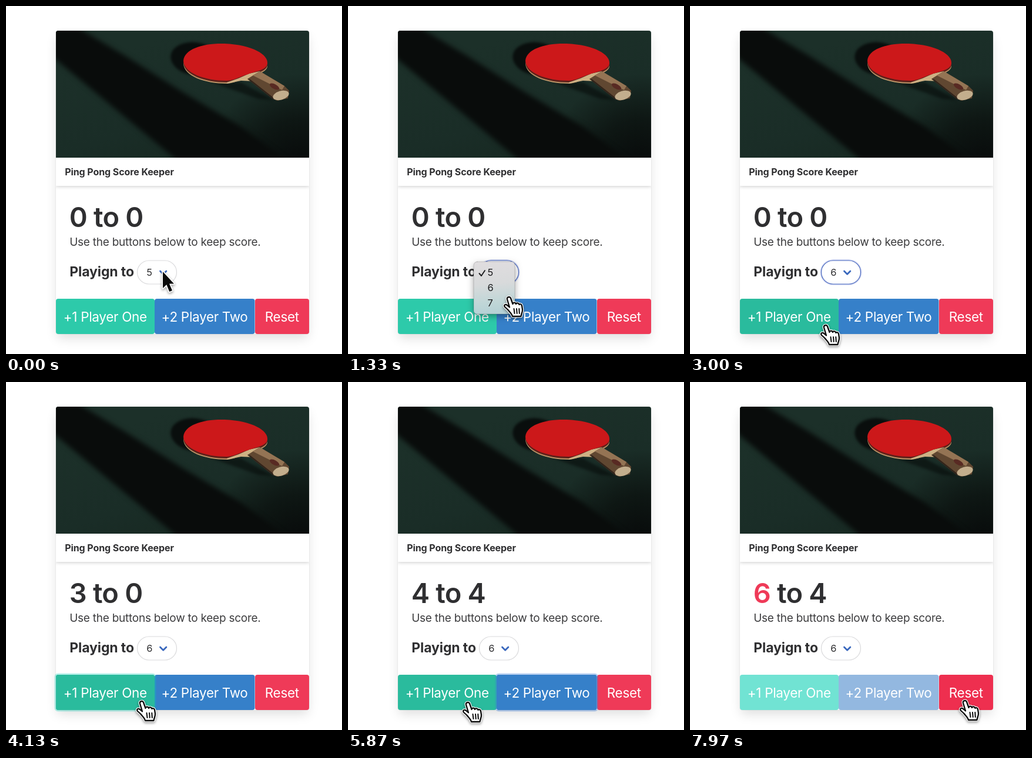
Animation, 572 px wide and 592 px high, one loop 8 s. Source, as an HTML page with a canvas:

```html
<!DOCTYPE html>
<html lang="en">
<head>
<meta charset="utf-8">
<title>Score keeper</title>
<style>
html, body { margin: 0; width: 100%; height: 100%; overflow: hidden; background: #fff; }
canvas { display: block; width: 572px; height: 592px; }
</style>
</head>
<body>
<canvas id="stage"></canvas>
<script>
const W = 572, H = 592, LOOP = 8000;
const INK = '#2f2f31', RED = '#ef3a58';
const canvas = document.getElementById('stage');
const dpr = window.devicePixelRatio || 1;
canvas.width = W * dpr;
canvas.height = H * dpr;
const ctx = canvas.getContext('2d');

// Timeline, in ms
const OPEN = 560, PICK = 2080, HAND_FROM = 60;
const ONE_CLICKS = [3240, 3580, 3920, 4330, 6150, 6480];
const TWO_CLICKS = [4900, 5120, 5340, 5540];
const WIN = ONE_CLICKS[5];

// Cursor tip: time, x, y
const PATH = [
  [0, 267, 452], [300, 267, 453], [900, 268, 455], [1330, 275, 494],
  [1550, 276, 502], [1850, 265, 479], [2150, 264, 480], [2500, 246, 526],
  [2750, 232, 542], [4420, 232, 542], [4780, 312, 541], [5580, 312, 541],
  [5850, 205, 544], [6500, 205, 544], [6700, 196, 537], [6860, 196, 537],
  [7400, 530, 545], [7520, 530, 545], [7820, 469, 541], [LOOP, 469, 541]
];

const BUTTONS = [
  { label: '+1 Player One', x: 85, w: 168, fill: '#2dcaaa', hover: '#2abb9d', off: '#71e3d3', ring: 'rgba(0,205,180,.28)' },
  { label: '+2 Player Two', x: 253, w: 170.5, fill: '#3680c9', hover: '#327ac2', off: '#93b8e0', ring: 'rgba(60,125,215,.35)' },
  { label: 'Reset', x: 424, w: 92, fill: RED, hover: '#ee2f4f' }
];
const BTN_Y = 498, BTN_H = 60;

const count = (times, t) => times.filter(c => c <= t).length;
const ease = u => u * u * (3 - 2 * u);

function cursorAt(t) {
  const i = Math.max(1, PATH.findIndex(p => p[0] > t));
  const [t0, x0, y0] = PATH[i - 1], [t1, x1, y1] = PATH[i];
  const u = ease((t - t0) / (t1 - t0));
  return { x: x0 + (x1 - x0) * u, y: y0 + (y1 - y0) * u };
}

function text(c, str, x, y, size, weight, color, spacing = 0, align = 'left') {
  c.font = `${weight} ${size}px Inter, "Liberation Sans", sans-serif`;
  c.letterSpacing = spacing + 'px';
  c.textAlign = align;
  c.fillStyle = color;
  c.fillText(str, x, y);
  return c.measureText(str).width;
}

function box(c, x, y, w, h, r, fill) {
  c.beginPath();
  c.roundRect(x, y, w, h, r);
  if (fill) { c.fillStyle = fill; c.fill(); }
}

function poly(c, pts, fill) {
  c.beginPath();
  for (let i = 0; i < pts.length; i += 2) c.lineTo(pts[i], pts[i + 1]);
  c.closePath();
  c.fillStyle = fill;
  c.fill();
}

function oval(c, x, y, rx, ry, turn, fill) {
  c.beginPath();
  c.ellipse(x, y, rx, ry, turn, 0, Math.PI * 2);
  c.fillStyle = fill;
  c.fill();
}

function shadow(c, color, blur, dy) {
  c.shadowColor = color;
  c.shadowBlur = blur * dpr;
  c.shadowOffsetY = dy * dpr;
}

function blade(c, dy, fill) {
  c.beginPath();
  c.moveTo(302, 93 + dy);
  c.bezierCurveTo(304, 73 + dy, 335, 63 + dy, 372, 64 + dy);
  c.bezierCurveTo(420, 66 + dy, 447, 83 + dy, 445, 98 + dy);
  c.bezierCurveTo(443, 109 + dy, 425, 111 + dy, 412, 116 + dy);
  c.bezierCurveTo(395, 121 + dy, 390, 126 + dy, 376, 127 + dy);
  c.bezierCurveTo(338, 127 + dy, 303, 114 + dy, 302, 93 + dy);
  c.fillStyle = fill;
  c.fill();
}

function photo(c) {
  c.save();
  box(c, 85, 42, 431, 216, [4, 4, 0, 0]);
  c.clip();
  const felt = c.createLinearGradient(300, 42, 370, 258);
  felt.addColorStop(0, '#1c3029');
  felt.addColorStop(.6, '#1a2d27');
  felt.addColorStop(1, '#172821');
  c.fillStyle = felt;
  c.fillRect(85, 42, 431, 216);

  const dark = c.createRadialGradient(500, 275, 20, 500, 275, 160);
  dark.addColorStop(0, 'rgba(8,11,11,.95)');
  dark.addColorStop(.45, 'rgba(9,13,12,.65)');
  dark.addColorStop(1, 'rgba(10,15,14,0)');
  c.fillStyle = dark;
  c.fillRect(85, 42, 431, 216);

  c.filter = `blur(${4 * dpr}px)`;
  poly(c, [75, 32, 114, 32, 205, 86, 300, 146, 400, 205, 485, 268, 298, 268, 75, 83], '#090c0b');
  c.filter = `blur(${2 * dpr}px)`;
  oval(c, 322, 90, 42, 28, .15, '#090e0d');
  poly(c, [345, 128, 400, 130, 455, 160, 430, 158], 'rgba(8,12,11,.6)');
  c.filter = 'none';

  blade(c, 5, '#bd9668');
  blade(c, 3, '#60201a');
  poly(c, [376, 130, 396, 123, 414, 115, 432, 111, 424, 128, 400, 127, 376, 132], '#ceb184');
  poly(c, [411, 124, 432, 111, 474, 136, 482, 144, 480, 157, 462, 161, 454, 158], '#604731');
  poly(c, [420, 118, 432, 111, 474, 136, 470, 143], '#947454');
  poly(c, [411, 124, 416, 125, 458, 158, 454, 158], '#30231a');
  oval(c, 457, 137, 9, 4, .5, '#582a23');
  oval(c, 468, 152, 14, 7.5, -.28, '#c3ae8d');
  blade(c, 0, '#cc181a');
  c.restore();
}

function drawCard(c) {
  c.save();
  shadow(c, 'rgba(10,10,10,.13)', 19, 9);
  box(c, 87, 44, 427, 512, 4, '#fff');
  c.restore();
  box(c, 84, 41, 433, 518, 5, 'rgba(10,10,10,.035)');
  box(c, 85, 42, 431, 516, 4, '#fff');
  c.save();
  c.beginPath();
  c.rect(85, 258, 431, 60);
  c.clip();
  shadow(c, 'rgba(10,10,10,.16)', 5, 2);
  c.fillStyle = '#fff';
  c.fillRect(85, 258, 431, 48);
  c.restore();
  photo(c);
  text(c, 'Ping Pong Score Keeper', 100.2, 288, 16, 700, INK, -.09);
  text(c, 'Use the buttons below to keep score.', 108.2, 408, 19, 400, '#3c3c3e', -.25);
  text(c, 'Playign to', 108.3, 460, 23, 700, INK, -.12);
}

// The unchanging parts are painted once
let still = null;
function renderStill() {
  still = document.createElement('canvas');
  still.width = canvas.width;
  still.height = canvas.height;
  const c = still.getContext('2d');
  c.scale(dpr, dpr);
  c.fillStyle = '#fff';
  c.fillRect(0, 0, W, H);
  drawCard(c);
}

function drawScore(one, two, won) {
  let x = 107.8;
  x += text(ctx, String(one), x, 376, 47, 600, won ? RED : INK, -.8);
  text(ctx, ' to ' + two, x, 376, 47, 600, INK, -.8);
}

function drawSelect(value, focused) {
  if (focused) box(ctx, 221.5, 431, 71, 44, 22, '#d3d9f3');
  box(ctx, 223.5, 433, 67, 40, 20, '#fff');
  ctx.strokeStyle = focused ? '#4766bd' : '#d9d9db';
  ctx.lineWidth = 1.2;
  ctx.stroke();
  text(ctx, value, 239.3, 459, 16.5, 400, INK);
  ctx.beginPath();
  ctx.moveTo(262.5, 451);
  ctx.lineTo(267.7, 456.2);
  ctx.lineTo(272.9, 451);
  ctx.strokeStyle = '#3a68bd';
  ctx.lineWidth = 2.8;
  ctx.lineCap = ctx.lineJoin = 'round';
  ctx.stroke();
}

function drawButtons(hover, focus, won) {
  BUTTONS.forEach((b, i) => {
    const off = won && b.off;
    box(ctx, b.x, BTN_Y, b.w, BTN_H, 4, off ? b.off : hover === i ? b.hover : b.fill);
  });
  const f = BUTTONS[focus];
  if (f) {
    box(ctx, f.x - 2.5, BTN_Y - 2.5, f.w + 5, BTN_H + 5, 6, f.ring);
    box(ctx, f.x, BTN_Y, f.w, BTN_H, 4, hover === focus ? f.hover : f.fill);
  }
  BUTTONS.forEach(b => text(ctx, b.label, b.x + b.w / 2 - .2, 537, 22.5, 400, '#fff', -.32, 'center'));
}

function drawMenu(lit) {
  const x = 214, y = 435, w = 70, h = 89;
  ctx.save();
  shadow(ctx, 'rgba(0,0,0,.35)', 12, 4);
  box(ctx, x, y, w, h, 6, '#dddcde');
  ctx.restore();
  const tint = ctx.createLinearGradient(x, y, x + 8, y + h);
  tint.addColorStop(0, '#e0dddf');
  tint.addColorStop(.45, '#d8dadb');
  tint.addColorStop(.8, '#c0d6d7');
  tint.addColorStop(1, '#b5d1d5');
  box(ctx, x, y, w, h, 6, tint);
  ctx.strokeStyle = 'rgba(0,0,0,.2)';
  ctx.lineWidth = .8;
  ctx.stroke();
  ['5', '6', '7'].forEach((n, i) => {
    const on = lit === i;
    if (on) box(ctx, x + 5, 441 + i * 26, w - 10, 25, 4, '#3d79d8');
    text(ctx, n, 237.5, 459 + i * 26, 16.5, 400, on ? '#fff' : '#1c1c1e');
  });
  ctx.beginPath();
  ctx.moveTo(223.5, 455);
  ctx.lineTo(227, 459);
  ctx.lineTo(233, 450);
  ctx.strokeStyle = '#1c1c1e';
  ctx.lineWidth = 1.9;
  ctx.stroke();
}

function outlined(path, outer, inner, fill) {
  ctx.lineJoin = 'round';
  ctx.save();
  shadow(ctx, 'rgba(0,0,0,.4)', 4, 2);
  ctx.strokeStyle = '#fff';
  ctx.lineWidth = outer;
  ctx.stroke(path);
  ctx.restore();
  ctx.fillStyle = fill;
  ctx.fill(path);
  if (inner) {
    ctx.strokeStyle = '#0a0a0a';
    ctx.lineWidth = inner;
    ctx.stroke(path);
  }
}

const ARROW = new Path2D('M0 0V28L6.3 22L11.2 34L16 32L11 20.5H19Z');
const HAND = new Path2D('M-4 5C-5 1 .5-.5 2 3L5.5 13C6 9.8 10 9.8 11 13C11.5 10.8 15.5 10.8 16.5 14' +
  'C17.5 12.3 20.5 13 21 16L22 22C22.5 27 20 29 19.5 34H5C4 29.5 1 27.5-3 22.5L-8 18C-10.5 15-7 12.5-4 15L0 18.5Z');
const HAND_LINES = new Path2D('M7.5 21L8.5 29M12 21L12.7 29M16.3 21L16.8 29');

function drawCursor(p, kind) {
  ctx.save();
  ctx.translate(p.x, p.y);
  ctx.lineCap = 'round';
  if (kind === 'hand') {
    outlined(HAND, 4.6, 2.3, '#fff');
    ctx.lineWidth = 2;
    ctx.stroke(HAND_LINES);
  } else {
    if (kind === 'banned') {
      const sign = new Path2D();
      sign.arc(20.5, 46.5, 17, 0, Math.PI * 2);
      sign.moveTo(9, 35);
      sign.lineTo(32, 58);
      ctx.save();
      shadow(ctx, 'rgba(0,0,0,.3)', 3, 1);
      ctx.strokeStyle = '#f6f6f6';
      ctx.lineWidth = 7.5;
      ctx.stroke(sign);
      ctx.restore();
      ctx.strokeStyle = '#c6c6c8';
      ctx.lineWidth = 4.8;
      ctx.stroke(sign);
    }
    outlined(ARROW, 3.4, 0, '#0a0a0a');
  }
  ctx.restore();
}

function draw(t) {
  const p = cursorAt(t);
  const open = t >= OPEN && t < PICK;
  const won = t >= WIN;
  const over = open ? -1 : BUTTONS.findIndex(b =>
    p.x >= b.x && p.x < b.x + b.w && p.y >= BTN_Y && p.y < BTN_Y + BTN_H);

  // The latest click holds the focus ring
  const latest = clicks => Math.max(-1, ...clicks.filter(c => c <= t));
  const one = latest(ONE_CLICKS), two = latest(TWO_CLICKS);
  const focus = won || one === two ? -1 : one > two ? 0 : 1;
  const selectFocus = t >= OPEN && t < ONE_CLICKS[0];

  ctx.setTransform(1, 0, 0, 1, 0, 0);
  ctx.drawImage(still, 0, 0);
  ctx.scale(dpr, dpr);
  drawScore(count(ONE_CLICKS, t), count(TWO_CLICKS, t), won);
  drawSelect(t < PICK ? '5' : '6', selectFocus);
  drawButtons(over, focus, won);
  if (open) drawMenu(t > 1820 ? 1 : -1);

  const onSelect = t >= HAND_FROM && t < 2300;
  const banned = won && (over === 0 || over === 1);
  drawCursor(p, banned ? 'banned' : over >= 0 || onSelect ? 'hand' : 'arrow');
}

renderStill();
const start = performance.now();
function tick() {
  draw((performance.now() - start) % LOOP);
  requestAnimationFrame(tick);
}
tick();
</script>
</body>
</html>
```
